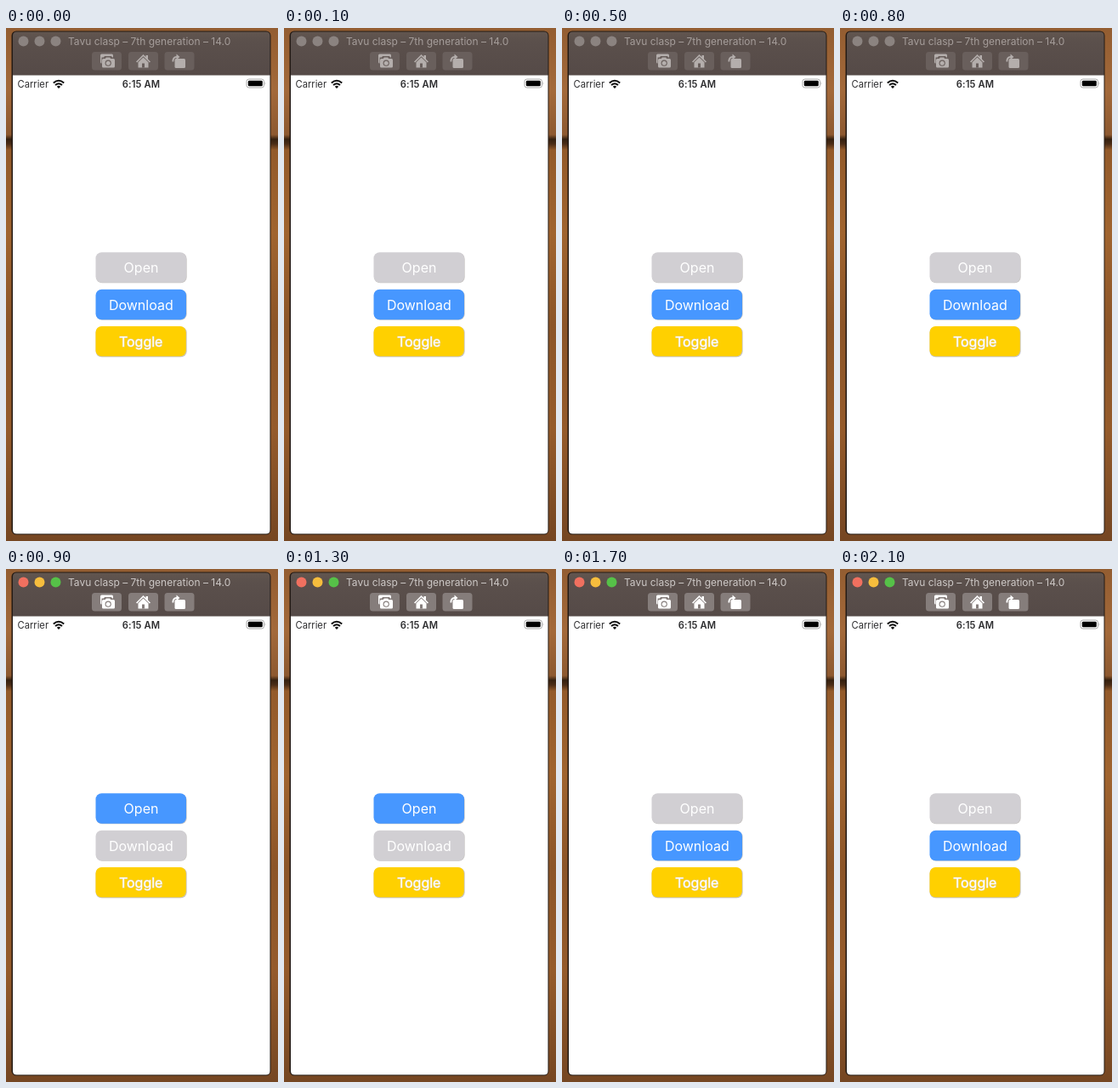
An HTML page for the animation above (2200 ms loop, 320 px wide and 602 px high).

```html
<!DOCTYPE html>
<html lang="en">
<head>
<meta charset="utf-8">
<title>Simulator buttons</title>
<style>
html, body { margin: 0; width: 100%; height: 100%; overflow: hidden; }
body { background: #8a5429; }
svg { display: block; width: 320px; height: 602px; font-family: Inter, Roboto, sans-serif; }

/* The window gains focus at 900 ms; the two buttons swap at 900 and 1400 ms. */
.wake { animation: wake 2.2s step-end infinite; }
.swap { animation: swap 2.2s step-end infinite; }
@keyframes wake {
  0% { fill: var(--off); }
  40.909%, 100% { fill: var(--on); }
}
@keyframes swap {
  0%, 63.636%, 100% { fill: var(--off); }
  40.909% { fill: var(--on); }
}
.title { --off: #a59d9a; --on: #cdc8c6; font-size: 12px; }
.key { --off: #695f5c; --on: #857d7b; }
.icon { --off: #b4aeac; --on: #fff; }
.red { --off: #8b8380; --on: #f0705f; }
.amber { --off: #8b8380; --on: #f6bd3d; }
.green { --off: #8b8380; --on: #56c148; }
.open { --off: #d1cfd3; --on: #4797ff; }
.download { --off: #4797ff; --on: #d1cfd3; }
.status { font-size: 11.2px; fill: #2d2d2f; }
.label { font-size: 16px; fill: #fff; text-anchor: middle; }
.edge { fill: #c9c6c4; }
</style>
</head>
<body>
<svg viewBox="0 0 320 602">
  <defs>
    <linearGradient id="wood" x2="0" y2="1">
      <stop offset="0" stop-color="#935d31"/>
      <stop offset=".12" stop-color="#a3693a"/>
      <stop offset=".208" stop-color="#8d5930"/>
      <stop offset=".217" stop-color="#35200f"/>
      <stop offset=".226" stop-color="#4a2c16"/>
      <stop offset=".238" stop-color="#935a2a"/>
      <stop offset=".4" stop-color="#a0642f"/>
      <stop offset=".58" stop-color="#8c5528"/>
      <stop offset=".78" stop-color="#955b2b"/>
      <stop offset="1" stop-color="#754622"/>
    </linearGradient>
    <linearGradient id="bar" x2="0" y2="1">
      <stop offset="0" stop-color="#62564f"/>
      <stop offset=".2" stop-color="#5b504c"/>
      <stop offset="1" stop-color="#554a47"/>
    </linearGradient>
  </defs>

  <rect width="320" height="602" fill="url(#wood)"/>
  <rect x="6.5" y="3.5" width="305" height="591" rx="5.5" fill="#231a15"/>
  <path d="M8 56V9q0-4.500 4.500-4.500H306q4.500 0 4.500 4.500V56Z" fill="url(#bar)"/>
  <path d="M8 55.500H310.500V589q0 4.500-4.500 4.500H12.500q-4.500 0-4.500-4.500Z" fill="#fff"/>

  <circle class="wake red" cx="20.500" cy="15.500" r="6"/>
  <circle class="wake amber" cx="39.500" cy="15.500" r="6"/>
  <circle class="wake green" cx="58.500" cy="15.500" r="6"/>
  <text class="wake title" x="73" y="20">Tavu clasp – 7th generation – 14.0</text>

  <g class="wake key">
    <rect x="101" y="28" width="35" height="21.500" rx="3.500"/>
    <rect x="144" y="28" width="35" height="21.500" rx="3.500"/>
    <rect x="186.500" y="28" width="35" height="21.500" rx="3.500"/>
  </g>
  <g class="wake icon">
    <rect x="111" y="30.500" width="15" height="11" rx="1.500"/>
    <path d="M153 39.500 161.500 31l3 3v-2h2.500v4.500l3 3-1.200 1-7.300-7.200-7.300 7.200Z"/>
    <path d="M155.500 40.300 161.500 34.500l6 5.800V46.500H155.500Z"/>
    <rect x="198.500" y="36" width="12.500" height="11" rx="1.500"/>
    <path d="M195.500 39.500q0-6.500 5-6.500v-2.500l4 3.500-4 3.300V35q-3.200 0-3.200 4.500Z"/>
  </g>
  <path class="wake key" d="M112.500 34.500h2.500l1-1.500h8l1 1.500h4.500v12.500h-17Z"/>
  <path class="wake icon" d="M114.500 36h2.200l1.200-1.500h4.200l1.200 1.500h3.200q1.500 0 1.500 1.500v7.500q0 1.500-1.500 1.500h-12q-1.500 0-1.500-1.500v-7.500q0-1.500 1.500-1.500Z"/>
  <circle class="wake key" cx="120.200" cy="41.200" r="3.600"/>
  <circle class="wake icon" cx="120.200" cy="41.200" r="2.500"/>
  <rect class="wake key" x="160" y="41.500" width="3" height="5"/>

  <text class="status" x="13.500" y="69.800">Carrier</text>
  <text class="status" x="159" y="69.500" text-anchor="middle" font-weight="600" letter-spacing=".1">6:15 AM</text>
  <g fill="none" stroke="#111" stroke-width="2">
    <path d="M55.800 64.600q6.200-5.600 12.400 0"/>
    <path d="M58 67q4-3.600 8 0"/>
  </g>
  <path d="M59.800 68.700q2.200-1.800 4.400 0l-2.200 2.200Z" fill="#111"/>
  <rect x="283" y="60" width="20.500" height="10" rx="2.800" fill="#fff" stroke="#aaa"/>
  <rect x="284.800" y="61.800" width="17" height="6.500" rx="1.400"/>
  <path d="M304.700 63.200q1.600 1.800 0 3.600Z" fill="#aaa"/>

  <g class="edge">
    <rect x="106" y="264" width="106.700" height="35.300" rx="7"/>
    <rect x="106" y="307.500" width="106.700" height="35.300" rx="7"/>
    <rect x="105.500" y="350.500" width="107.200" height="35.800" rx="7"/>
  </g>
  <rect class="swap open" x="105.500" y="263.300" width="106.500" height="35.500" rx="7"/>
  <rect class="swap download" x="105.500" y="306.800" width="106.500" height="35.500" rx="7"/>
  <rect x="105.500" y="350" width="106.300" height="35.300" rx="7" fill="#ffd000"/>

  <g class="label">
    <text x="159" y="287.300">Open</text>
    <text x="158.800" y="330.800">Download</text>
    <text x="158.700" y="374" stroke="#e5d29a" stroke-width="1.200" paint-order="stroke">Toggle</text>
  </g>
</svg>
</body>
</html>
```
